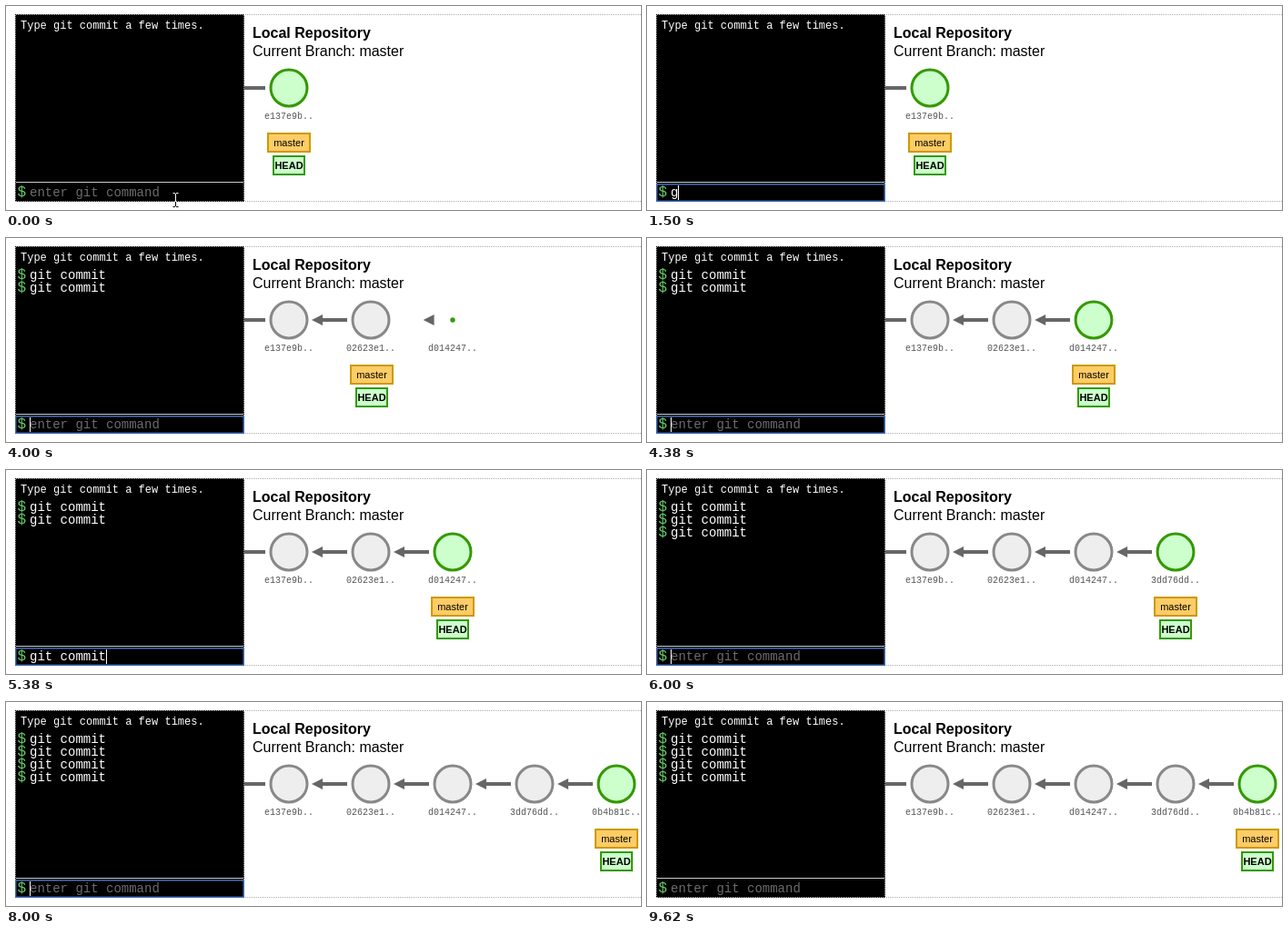
These frames come from a looping animation (698x224 px, 9740 ms). An HTML page:

```html
<!DOCTYPE html>
<html lang="en">
<head>
<meta charset="utf-8">
<title>git commit</title>
<style>
  html, body { margin: 0; width: 100%; height: 100%; overflow: hidden; background: #fff; }
  svg { display: block; }
  text { white-space: pre; font-family: "Liberation Sans", Arial, sans-serif; }
  .mono { font-family: "Liberation Mono", "Courier New", monospace; font-size: 14px; fill: #fff; }
  .mono.note { font-size: 12px; }
  .mono.prompt { font-size: 16px; fill: #6c6; }
  .mono.hint { fill: #6c6c6c; }
  .mono.id { font-size: 10px; fill: #555; }
  .mid { text-anchor: middle; }
  .tag { font-size: 11px; }
  .bold { font-weight: bold; }
  .dots { fill: none; stroke: #aaa; stroke-dasharray: 1 1; stroke-dashoffset: 1; }
  .ring { fill: none; stroke: #446cb8; stroke-width: 1.5; }
  .cursor { fill: none; stroke: #fff; mix-blend-mode: difference; }
</style>
</head>
<body>
<svg id="stage" width="698" height="224" viewBox="0 0 698 224"></svg>
<script>
const LOOP = 9740, STEP = 125, MOVE = 500, BLINK = 530;
const FOCUS = 340, BLUR = 9625;
const COMMAND = 'git commit', CHAR = 8.4;
const IDS = ['e137e9b..', '02623e1..', 'd014247..', '3dd76dd..', '0b4b81c..'];
const COMMITS = [2524, 3930, 5550, 7550];   // when each command is entered

// Each run: start time, then the number of typed characters at every step.
const RUNS = [
  [1500, 1, 2, 3, 4, 5, 7, 8, 10],
  [2875, 1, 2, 3, 5, 7, 7, 9, 10],
  [4500, 1, 2, 3, 5, 7, 7, 9, 10],
  [6500, 1, 2, 3, 4, 5, 7, 8, 10]
];
const KEYS = RUNS.flatMap(([start, ...counts]) =>
  counts.map((count, i) => ({ at: start + i * STEP, count })));
const EVENTS = [{ at: FOCUS, count: 0 }, ...KEYS, ...COMMITS.map(at => ({ at, count: 0 }))]
  .sort((a, b) => a.at - b.at);

const stage = document.getElementById('stage');
const clamp = v => Math.max(0, Math.min(1, v));
const ease = p => p < .5 ? 4 * p ** 3 : 1 - 4 * (1 - p) ** 3;
const mix = (a, b, p) => a + (b - a) * p;
const commitX = i => 311 + 90 * i;

const text = (x, y, cls, str) => `<text x="${x}" y="${y}" class="${cls}">${str}</text>`;
const rect = (x, y, w, h, attrs) =>
  `<rect x="${x}" y="${y}" width="${w}" height="${h}" ${attrs}/>`;

function commit(i, grow, current) {
  const x = commitX(i), from = x - 26, to = mix(from, commitX(i - 1) + 31, grow);
  const colors = current ? 'fill="#cfc" stroke="#390"' : 'fill="#eee" stroke="#888"';
  return `<path d="M${from} 90H${to}" stroke="#666" stroke-width="4"/>
    <path d="M${to + 6} 84l-12 6l12 6z" fill="#666"/>
    <circle cx="${x}" cy="90" r="${mix(1, 20, grow)}" ${colors} stroke-width="3"/>`
    + text(x, 124, 'mono id mid', IDS[i]);
}

function tag(x, y, w, label, cls, colors) {
  return rect(x - w / 2, y, w, 20, `${colors} stroke-width="2"`)
    + text(x, y + 14, 'tag mid ' + cls, label);
}

function repository(now, entered) {
  const grow = i => i ? ease(clamp((now - COMMITS[i - 1]) / MOVE)) : 1;
  let out = text(271, 35, 'bold', 'Local Repository')
    + text(271, 55, '', 'Current Branch: master');
  for (let i = 0; i <= entered; i++) out += commit(i, grow(i), i === entered);
  const x = Math.round(mix(commitX(Math.max(0, entered - 1)), commitX(entered), grow(entered)));
  return out + tag(x, 140, 46, 'master', '', 'fill="#fc6" stroke="#c90"')
    + tag(x, 165, 34, 'HEAD', 'bold', 'fill="#cfc" stroke="#390"');
}

function terminal(now, entered) {
  const focused = now >= FOCUS && now < BLUR;
  const last = EVENTS.filter(e => e.at <= now).pop() || { at: 0, count: 0 };
  let out = rect(10, 9, 252, 206, '')
    + text(16, 25, 'mono note', 'Type git commit a few times.');
  for (let i = 0; i < entered; i++) {
    out += text(12.5, 45 + 14 * i, 'mono prompt', '$') + text(26, 45 + 14 * i, 'mono', COMMAND);
  }
  out += rect(11, 193, 250, 1, 'fill="#ccc"') + text(12.5, 209, 'mono prompt', '$');
  out += last.count
    ? text(26, 209, 'mono', COMMAND.slice(0, last.count))
    : text(26, 209, 'mono hint', 'enter git command');
  out += '<path class="dots" d="M10 9.5H698M10 214.5H698M10.5 9V215M261.5 9V215"/>';
  if (focused) {
    out += rect(10.75, 195.75, 250.5, 18.5, 'class="ring"');
    if ((now - last.at) % (2 * BLINK) < BLINK) {
      out += rect(Math.round(26 + CHAR * last.count), 197, 1, 16, 'fill="#fff"');
    }
  }
  return out;
}

function cursor(now) {
  if (now >= RUNS[0][0]) return '';
  const p = clamp(now / 500);
  return `<path class="cursor" transform="translate(${Math.round(mix(186, 162, p))}.5 ${Math.round(mix(205, 197, p))})"
    d="M-3 .5h2.5m1 0h2.5M0 1v14M-3 15.5h2.5m1 0h2.5"/>`;
}

function draw(time) {
  const now = Math.floor((time % LOOP + 5) / STEP) * STEP;
  const entered = COMMITS.filter(at => at <= now).length;
  stage.innerHTML = rect(0, 0, 698, 224, 'fill="#fff"')
    + repository(now, entered) + terminal(now, entered) + cursor(now);
}

const start = performance.now();
function tick() {
  draw(performance.now() - start);
  requestAnimationFrame(tick);
}
tick();
</script>
</body>
</html>
```
